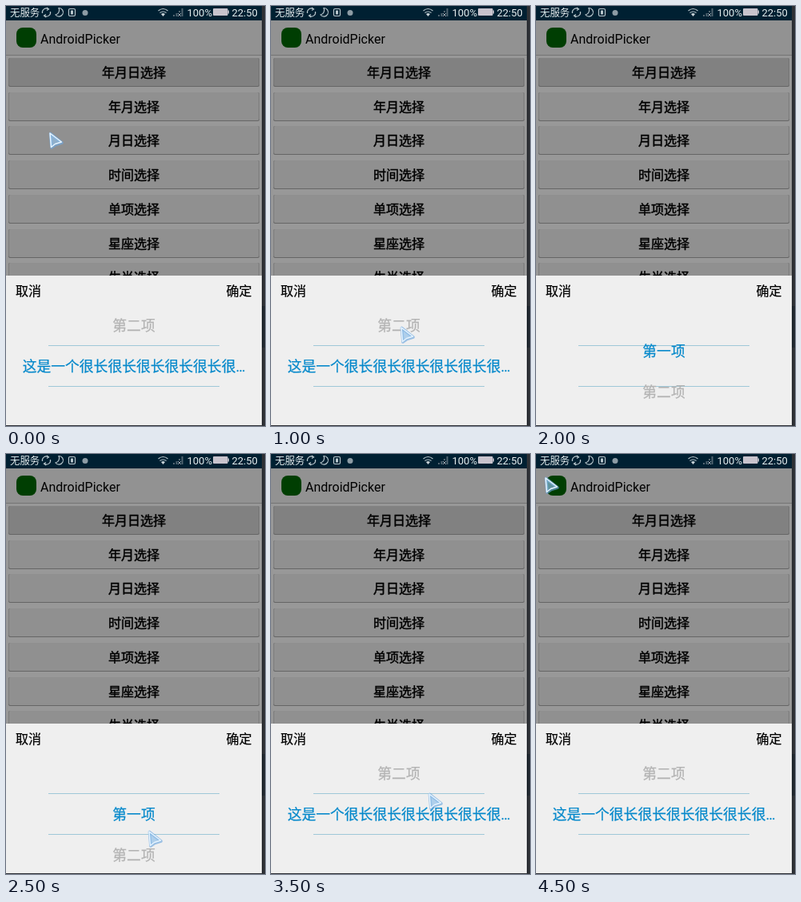
These frames come from a looping animation (324x525 px, 5000 ms). An HTML page:

```html
<!DOCTYPE html>
<html lang="zh">
<head>
<meta charset="utf-8">
<style>
  html, body { margin: 0; width: 100%; height: 100%; overflow: hidden; background: #2d3035; }
  svg { display: block; width: 324px; height: 525px; }
  text { font-family: Roboto, "Noto Sans CJK SC", "Noto Sans CJK", sans-serif; font-size: 16px; }
  .mid { text-anchor: middle; }
  .label { stroke: #000; stroke-width: .45; }
  .action { stroke: #000; stroke-width: .2; }
  .item { font-size: 17.8px; stroke-width: .25; }
  .status text { font-size: 13px; fill: #e6ecee; }
  .line { fill: none; stroke: #b9c6cc; stroke-width: 1.2; }
</style>
</head>
<body>
<svg viewBox="0 0 324 525">
  <rect x="320" width="4" height="525" fill="#2d3035"/>
  <rect x="320" y="375" width="4" height="52" fill="#20272f"/>
  <rect width="320" height="524" fill="#989898"/>

  <g class="status">
    <rect width="320" height="18" fill="#002032"/>
    <text x="5" y="13" style="font-size:12.4px">无服务</text>
    <path class="line" d="M45.500 9a5 5 0 0 1 7.500-5.300M55.500 7a5 5 0 0 1-7.500 5.300M51 2l2.500 2-2.500 1.500M50 14l-2.500-2 2.500-1.500"/>
    <path class="line" d="M66 2.500a5.300 5.300 0 1 1-4 8.500a6 6 0 0 0 4-8.500z"/>
    <rect class="line" x="78.500" y="3.500" width="8" height="9" rx="1.500"/>
    <rect x="81" y="5.500" width="3" height="5" fill="#b9c6cc"/>
    <circle cx="99" cy="8.500" r="3.500" fill="#8d9ca5"/>
    <path class="line" d="M190.500 6q6-5 12 0M192.500 8.500q4-3 8 0"/>
    <path d="M194 10q2.500-2 5 0l-2.500 3z" fill="#c9d3d8"/>
    <path d="M209 11h2v2h-2zM212.500 9h2v4h-2zM216 6h2v2h-2zM219.500 3h2v10h-2z" fill="#536571"/>
    <path class="line" d="M215 9l4 4m0-4l-4 4" style="stroke-width:.8"/>
    <text x="226.500" y="13">100%</text>
    <rect x="259" y="3" width="18.500" height="9" rx="1" fill="#c8c3cd"/>
    <rect x="277.500" y="5.500" width="1.500" height="4" fill="#c8c3cd"/>
    <text x="282.500" y="13">22:50</text>
  </g>

  <rect y="18" width="320" height="43" fill="#929292"/>
  <rect y="61" width="320" height="1" fill="#747474"/>
  <rect x="13" y="27" width="25" height="25" rx="8" fill="#003e02"/>
  <text x="43" y="46.500">AndroidPicker</text>
  <g id="buttons"></g>

  <rect y="337" width="320" height="187" fill="#efefef"/>
  <text class="action" x="12" y="362">取消</text>
  <text class="action" x="275.500" y="362">确定</text>
  <path d="M53 424.500H267M53 475.500H267" stroke="#9fc8d8"/>
  <g id="wheel"></g>

  <g id="cursor" stroke-linejoin="round">
    <path d="M2.500 2.500L4 20L9 16.500L17 14Z" fill="none" stroke="#6fa6dcaa" stroke-width="3.600"/>
    <path d="M2 2L3.500 19.500L8.500 15.500L16.500 13Z" fill="#8fbee8aa" stroke="#e6f4ff" stroke-width="1.500"/>
  </g>
</svg>
<script>
  const byId = id => document.getElementById(id);
  const labels = ["年月日选择", "年月选择", "月日选择", "时间选择", "单项选择", "星座选择", "生肖选择"];
  const items = ["第一项", "第二项", "这是一个很长很长很长很长很长很…"];
  const ROW = 51.2, STEP = 500;

  byId("buttons").innerHTML = labels.map((label, i) => {
    const y = Math.round(65 + i * 42.7);
    return `<rect x="3" y="${y}" width="314" height="36" rx="2" fill="#666"/>
      <rect x="3.500" y="${y}" width="313" height="35" rx="2" fill="${i ? "#909090" : "#818181"}"/>
      <text class="mid label" x="160" y="${y + 24}">${label}</text>`;
  }).join("");
  byId("wheel").innerHTML = items.map(item => `<text class="mid item" x="160">${item}</text>`).join("");
  const rows = [...byId("wheel").children];

  // Pointer position and centre of the first wheel row, one pose per step.
  const SETTLED = 451 - 2 * ROW;
  const poses = [
    [53, 157, SETTLED], [177, 478, SETTLED], [161, 400, SETTLED], [165, 421, SETTLED],
    [null, 0, 432], [177, 470, 451], [207, 354, 396], [196, 423, SETTLED],
    [71, 249, SETTLED], [10, 28, SETTLED]
  ];

  function draw(now) {
    const [x, y, top] = poses[Math.floor(now / STEP) % poses.length];
    byId("cursor").setAttribute("visibility", x === null ? "hidden" : "visible");
    byId("cursor").setAttribute("transform", `translate(${x ?? 0} ${y})`);
    rows.forEach((row, i) => {
      const center = top + i * ROW;
      const color = center > 424 && center < 475 ? "#0689cb" : "#b3b3b3";
      row.setAttribute("y", Math.round(center + 6));
      row.setAttribute("fill", color);
      row.setAttribute("stroke", color);
      row.setAttribute("visibility", center > 380 && center < 515 ? "visible" : "hidden");
    });
    requestAnimationFrame(draw);
  }
  draw(performance.now());
</script>
</body>
</html>
```
